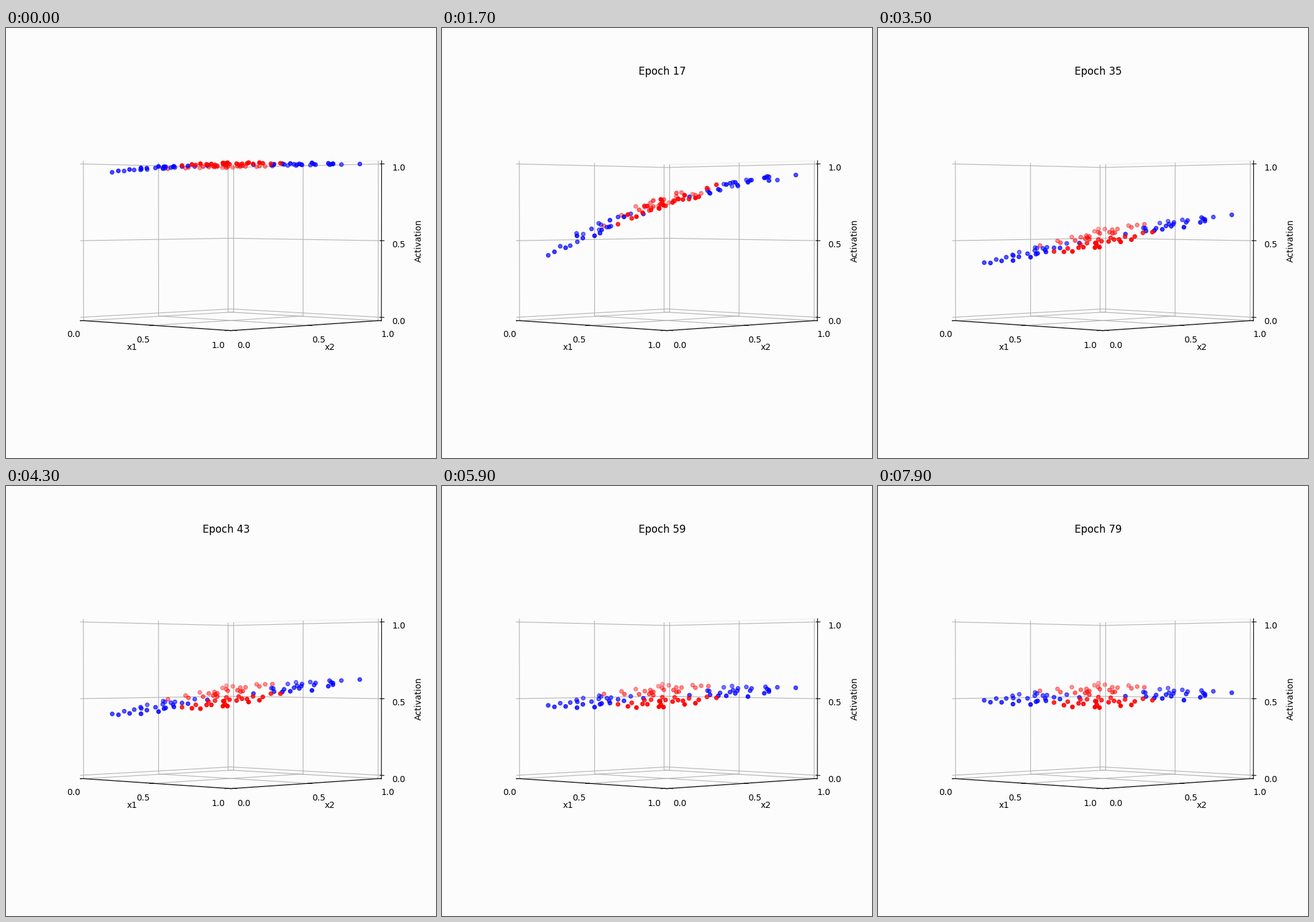
These frames come from a looping animation (700 by 700 pixels, 8000 ms). A matplotlib script:

```python
import numpy as np
import matplotlib.pyplot as plt
from matplotlib.animation import FuncAnimation

EPOCHS = 80
SIDE = .42    # edge of the square each cluster fills
CELLS = 5     # every cluster is a jittered CELLS x CELLS grid
SPREAD = 1.3  # samples of one pass see slightly older or newer weights

rng = np.random.default_rng(4)


def cluster(cx, cy):
    """Random samples spread evenly over a square around (cx, cy)."""
    cells = np.stack(np.meshgrid(range(CELLS), range(CELLS)), -1).reshape(-1, 2)
    jitter = rng.random(cells.shape)
    return np.array([cx, cy]) + SIDE * ((cells + jitter) / CELLS - .5)


blue = np.vstack([cluster(.24, .24), cluster(.75, .76)])
red = np.vstack([cluster(.26, .69), cluster(.66, .32)])
x1, x2 = np.vstack([blue, red]).T
colors = ["blue"] * len(blue) + ["red"] * len(red)

u, v = x1 + x2 - 1, x2 - x1  # across the view, and away from the viewer
phase = SPREAD * (rng.random(len(x1)) - .5)


def activation(epoch):
    """Output of the neuron: saturated at first, then tilting, then flat."""
    t = epoch + phase
    bias = .07 + 4.85 / (1 + np.exp((t - 13.1) / 3.1))
    started = 2 * np.log1p(np.exp((t - 9.5) / 2))  # soft start of the learning
    fade = np.exp(-started / 23)
    net = bias + fade * (2.3 * u - .18 * u ** 2) + .4 * (1 - fade) * v
    return 1 / (1 + np.exp(-net))


fig = plt.figure(figsize=(7, 7), dpi=100, facecolor="#fcfcfc")
ax = fig.add_subplot(projection="3d", facecolor="#fcfcfc")
ax.view_init(elev=1, azim=-45)

MARGIN = 1 / 48
lim = (-MARGIN, 1 + MARGIN)
ticks = [0, .5, 1]
ax.set(xticks=ticks, yticks=ticks, zticks=ticks,
       xlabel="x1", ylabel="x2", zlabel="Activation")
ax.xaxis.pane.set_visible(False)
ax.zaxis.pane.set_visible(False)
ax.yaxis.pane.set_fill(False)

dots = None


def draw(epoch):
    global dots
    if dots is not None:
        dots.remove()
    dots = ax.scatter(x1, x2, activation(epoch), c=colors)
    ax.set(xlim=lim, ylim=lim, zlim=lim)
    ax.set_title(f"Epoch {epoch}" if epoch else "")
    return []


anim = FuncAnimation(fig, draw, frames=EPOCHS, init_func=lambda: [],
                     interval=100, repeat=True, repeat_delay=0)
plt.show()
```
